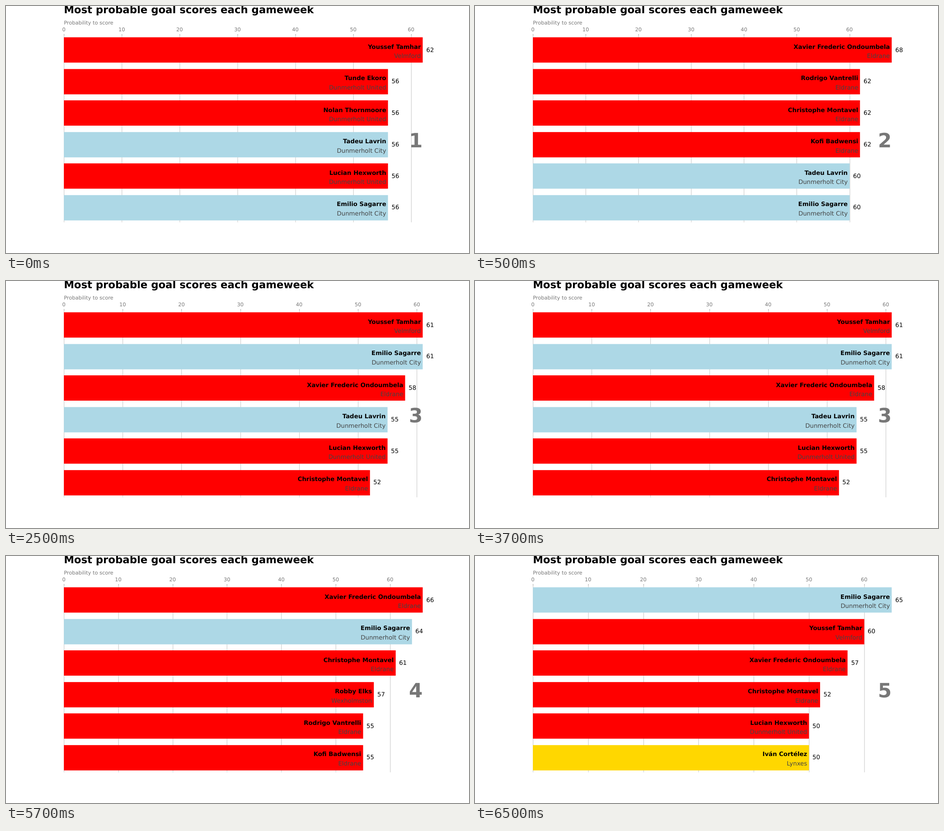
These frames come from a looping animation (1025 px wide and 547 px high, 8 s). An HTML page:

```html
<!DOCTYPE html>
<html lang="en">
<head>
<meta charset="utf-8">
<title>Most probable goal scores</title>
<style>
  html, body { margin: 0; width: 100%; height: 100%; overflow: hidden; background: #fff; }
  svg { display: block; font: 14px "DejaVu Sans", sans-serif; text-rendering: geometricPrecision; }
  .bold { font-weight: bold; }
  .title { font-size: 24px; }
  .small { font-size: 12px; fill: #777; }
  .team { fill: #444; }
  .week { font-size: 46px; fill: #777; }
</style>
</head>
<body>
<svg id="chart" width="1025" height="547" viewBox="0 0 1080 576" preserveAspectRatio="none"></svg>
<script>
// Plot area in chart units; six bars of 0.8 with a 1% margin fill its height.
const LEFT = 135, WIDTH = 837, TOP = 69.12, HEIGHT = 434.88;
const PITCH = HEIGHT / (5.8 * 1.02), BAR = 0.8 * PITCH, MARGIN = 0.058 * PITCH;
const LOOP = 8000, STARTS = [0, 500, 2500, 4500, 6500];

const COLORS = { "Dunmerholt City": "#add8e6", "Lynxes": "#ffd700" };
const PLAYERS = {
  yt: ["Youssef Tamhar", "Velmford"],
  te: ["Tunde Ekoro", "Dunmerholt United"],
  nt: ["Nolan Thornmoore", "Dunmerholt United"],
  tl: ["Tadeu Lavrin", "Dunmerholt City"],
  lh: ["Lucian Hexworth", "Dunmerholt United"],
  es: ["Emilio Sagarre", "Dunmerholt City"],
  xo: ["Xavier Frederic Ondoumbela", "Eldrane"],
  rv: ["Rodrigo Vantrelli", "Eldrane"],
  cm: ["Christophe Montavel", "Eldrane"],
  kb: ["Kofi Badwensi", "Eldrane"],
  re: ["Robby Elks", "Wexholmston"],
  ic: ["Iván Cortélez", "Lynxes"]
};
const WEEKS = [
  "yt 62 te 56 nt 56 tl 56 lh 56 es 56",
  "xo 68 rv 62 cm 62 kb 62 tl 60 es 60",
  "yt 61 es 61 xo 58 tl 55 lh 55 cm 52",
  "xo 66 es 64 cm 61 re 57 rv 55 kb 55",
  "es 65 yt 60 xo 57 cm 52 lh 50 ic 50"
].map(line => [...line.matchAll(/(\w+) (\d+)/g)].map(m => [m[1], +m[2]]));

const bar = (x, y, x2, y2, fill) => {
  [x, y, x2, y2] = [x, y, x2, y2].map(Math.round);
  return `<rect x="${x}" y="${y}" width="${x2 - x}" height="${y2 - y}" fill="${fill}"/>`;
};
const line = (x, y, y2, color) =>
  `<path d="M${Math.round(x) + 0.5} ${y}V${y2}" stroke="${color}" stroke-width="0.8"/>`;
const text = (s, x, y, cls = "", anchor = "start") =>
  `<text x="${x}" y="${Math.round(y)}" class="${cls}" text-anchor="${anchor}">${s}</text>`;

function draw(week) {
  const rows = WEEKS[week], max = rows[0][1], gap = WIDTH / 200;
  const px = v => LEFT + v / max * WIDTH;
  const py = share => TOP + (1 - share) * HEIGHT;
  let out = text("Most probable goal scores each gameweek", LEFT, py(1.12), "bold title")
          + text("Probability to score", LEFT, py(1.06), "small");

  for (let v = 0; v <= max; v += 10) {
    const x = px(v);
    out += line(x, 69, 504.5, "#b0b0b0")
         + line(x, 65.5, 69, "#777")
         + text(v, x, 59, "small", "middle");
  }

  rows.forEach(([id, value], i) => {
    const [name, team] = PLAYERS[id], x = px(value);
    const y = TOP + MARGIN + i * PITCH, mid = y + BAR / 2;
    out += bar(LEFT, y, x, y + BAR, COLORS[team] || "#f00")
         + text(name, x - gap, mid - 3, "bold", "end")
         + text(team, x - gap, mid + PITCH / 4, "team", "end")
         + text(value, x + 2 * gap, mid + 4);
  });

  chart.innerHTML = out + text(week + 1, LEFT + WIDTH, py(0.4), "bold week", "end");
}

const chart = document.getElementById("chart");
const begin = performance.now();
let shown = -1;
function tick() {
  const t = (performance.now() - begin) % LOOP;
  const week = STARTS.findLastIndex(s => t >= s);
  if (week !== shown) draw(shown = week);
  requestAnimationFrame(tick);
}
tick();
</script>
</body>
</html>
```
